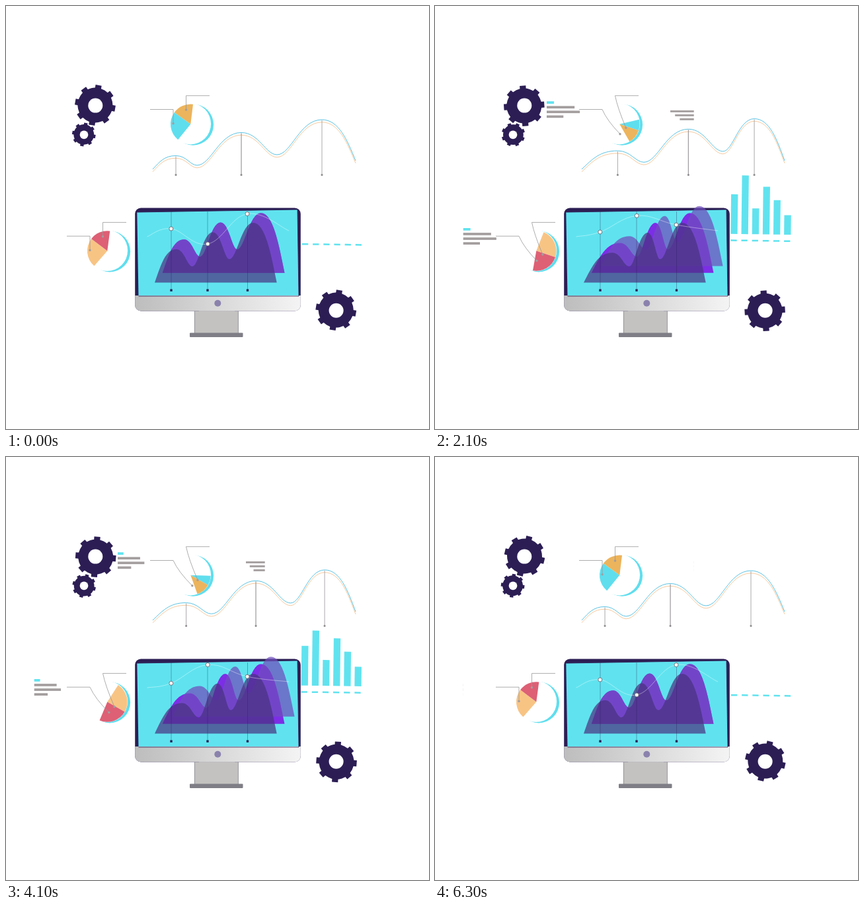
An HTML page with a canvas that plays this animation: 640 px wide and 640 px high, repeating every 6.4 s.

```html
<!DOCTYPE html>
<html>
<head>
<meta charset="utf-8">
<style>
html, body { margin: 0; width: 100%; height: 100%; overflow: hidden; background: #fff; }
canvas { display: block; width: 640px; height: 640px; }
</style>
</head>
<body>
<canvas id="stage"></canvas>
<script>
const LOOP = 6400;
const NAVY = '#2c1e54', CYAN = '#60e3ef', GRAY = '#a49e9f';
const canvas = document.getElementById('stage');
const dpr = window.devicePixelRatio || 1;
canvas.width = canvas.height = 640 * dpr;
const c = canvas.getContext('2d');

const mix = (a, b, k) => a + (b - a) * k;
const mixPoints = (from, to, k) => from.map((p, i) => [mix(p[0], to[i][0], k), mix(p[1], to[i][1], k)]);

// cubic-bezier(.6, 0, .4, 1)
function ease(x) {
  let lo = 0, hi = 1, s = .5;
  for (let i = 0; i < 24; i++) {
    s = (lo + hi) / 2;
    const r = 1 - s;
    if (1.8 * r * r * s + 1.2 * r * s * s + s * s * s < x) lo = s; else hi = s;
  }
  return s * s * (3 - 2 * s);
}

function yoyo(t, half) {
  const x = (t / half) % 2;
  return ease(x > 1 ? 2 - x : x);
}

function rect(x, y, w, h, fill) {
  c.fillStyle = fill;
  c.fillRect(x, y, w, h);
}

function disc(x, y, r, fill) {
  c.fillStyle = fill;
  c.beginPath();
  c.arc(x, y, r, 0, 7);
  c.fill();
}

function stroke(color, width) {
  c.strokeStyle = color;
  c.lineWidth = width;
  c.stroke();
}

function line(x1, y1, x2, y2, color, width) {
  c.beginPath();
  c.moveTo(x1, y1);
  c.lineTo(x2, y2);
  stroke(color, width);
}

// Path through alternating peaks (odd points, broad) and valleys (even points, narrow)
function humps(points) {
  const last = points.length - 1;
  const reach = i => i % 2 ? .5 : .32;
  c.beginPath();
  c.moveTo(...points[0]);
  for (let i = 1; i <= last; i++) {
    const [x0, y0] = points[i - 1], [x1, y1] = points[i];
    const dx = x1 - x0, dy = y1 - y0;
    const a = i === 1 ? [x0 + .3 * dx, y0 + .55 * dy] : [x0 + reach(i - 1) * dx, y0];
    const b = i === last ? [x1 - .25 * dx, y1 - .5 * dy] : [x1 - reach(i) * dx, y1];
    c.bezierCurveTo(...a, ...b, x1, y1);
  }
}

function gear(x, y, size, angle) {
  const tilt = (angle - 41) * Math.PI / 180;
  c.save();
  c.translate(x, y);
  c.scale(size, size);
  c.translate(.7 * Math.sin(tilt), -.7 * Math.cos(tilt));
  c.rotate(angle * Math.PI / 180);
  c.fillStyle = NAVY;
  c.beginPath();
  c.arc(0, 0, 26.5, 0, 7);
  c.fill();
  for (let i = 0; i < 8; i++) {
    c.fillRect(-4.6, -30.6, 9.2, 8);
    c.rotate(Math.PI / 4);
  }
  c.restore();
  disc(x, y, 11 * size, '#fff');
}

function textLines(x, y, q) {
  rect(x, y, 13 * q, 3.7, CYAN);
  [50, 59.5, 30].forEach((w, i) => rect(x, y + 7.1 * (i + 1), w * q, 3.7, GRAY));
}

function wedge(from, to, fill) {
  const rad = d => (d - 90) * Math.PI / 180;
  c.fillStyle = fill;
  c.beginPath();
  c.moveTo(279.3, 178.8);
  c.arc(279.3, 178.8, 30.3, rad(from), rad(to));
  c.fill();
}

function pointer(startX, cornerX, y, bend, dot) {
  c.beginPath();
  c.moveTo(startX, y);
  c.lineTo(cornerX, y);
  c.quadraticCurveTo(...bend, ...dot);
  stroke('#999', .8);
  disc(...dot, 1.7, GRAY);
}

function pie(dx, dy, p, lead, middle, tail, leadColor, tailColor) {
  c.save();
  c.translate(dx, dy);
  disc(283, 179.6, 31.1, '#5fdeee');
  disc(279, 178.3, 31.1, '#fff');
  const [a, b, d] = [lead, middle, tail].map(e => mix(e[0], e[1], p));
  wedge(d, b, tailColor);
  wedge(b, a, leadColor);
  pointer(308, 272.5, 135.7, [mix(272.5, 277, p), mix(146, 156, p)],
    [mix(272.5, 292.3, p), mix(157, 190, p)]);
  pointer(218, 253, 156.5, [mix(253, 262, p), mix(167, 175, p)],
    [mix(253, 285.6, p), mix(177.8, 197, p)]);
  c.restore();
}

function wave(q) {
  const points = mixPoints(
    [[222, 247], [257, 226.5], [289, 241], [356, 191.5], [410, 225], [478, 172], [529, 234]],
    [[222, 247], [280, 217.7], [321, 235.5], [388.5, 185.3], [440.5, 219], [484, 170.3], [529, 234]], q);
  humps(points.map(([x, y]) => [x, y + 3.8]));
  stroke('#f6c393', .9);
  humps(points);
  stroke('#5cc3e4', 1);
  [1, 3, 5].forEach(i => {
    const [x, y] = points[i];
    line(x, y + 1, x, 255.5, '#a2a0a2', i === 3 ? 1.3 : .9);
    disc(x, 255.5, 1.5, '#8d8a8d');
  });
}

function bars(p, q, reveal) {
  const drift = p * (1 - q);
  c.save();
  c.transform(1, .014, 0, 1, 448 - 5 * drift, 360.2 - 1.2 * drift - 6.5 * q);
  [60, 89, 39, 72, 52, 29.5].forEach((h, i) => {
    rect(i * 16.15, -1.3, 9.3, 2.5, CYAN);
    const shown = Math.min(h, reveal);
    if (shown > 1) {
      c.save();
      c.transform(1, 0, -.012, 1, i * 16.15, -9.8);
      rect(0, -shown, 10.3, shown, CYAN);
      c.restore();
    }
  });
  c.restore();
}

function monitor() {
  rect(285.3, 460, 66, 36, '#c3c2c0');
  c.strokeStyle = '#77757c';
  c.lineWidth = .7;
  c.strokeRect(285.3, 460, 66, 36);
  c.fillStyle = '#7f7e86';
  c.beginPath();
  c.roundRect(278, 494.5, 80.5, 6.5, 1);
  c.fill();

  c.beginPath();
  c.roundRect(195.2, 305.4, 250.6, 156, 9);
  c.fillStyle = NAVY;
  c.fill();
  c.save();
  c.clip();
  c.fillStyle = CYAN;
  c.beginPath();
  [[198.3, 312], [441, 308], [443, 439], [200.5, 439]].forEach(p => c.lineTo(...p));
  c.fill();
  const shade = c.createLinearGradient(195, 0, 446, 0);
  shade.addColorStop(0, '#bdbdbd');
  shade.addColorStop(1, '#f4f4f4');
  rect(195, 438, 251, 24, shade);
  c.restore();
  stroke(NAVY, .8);
  line(292, 461.7, 346, 461.7, '#c9c8c8', .8);
  disc(320.3, 449.8, 5, '#8b82ad');
}

function mountains(p, q) {
  const points = mixPoints(
    [[225, 418.6], [257.7, 368], [282, 394], [313, 342.3], [338, 383], [374, 328], [409.7, 418.6]],
    [[225, 418.6], [270.5, 374.3], [296, 394], [323.5, 343], [341, 383], [374, 328], [409.7, 418.6]], q);
  const layer = (dx, dy, fill) => {
    humps(points.map(([x, y]) => [x + dx, y + dy]));
    c.closePath();
    c.fillStyle = fill;
    c.fill();
  };
  layer(11.8, -14.8, '#7c2ee6');
  layer(11.8 + 17 * p, -14.8 - 12.5 * p, 'rgba(112,78,189,.72)');
  layer(0, 0, 'rgba(72,50,128,.7)');
}

function tracker(p) {
  const points = [[213.5, 349], [249.8, mix(337, 343, p)], [305.2, mix(360, 308.5, p)],
    [365, mix(314.5, 334.5, p)], [428, 340]];
  const at = i => points[Math.max(0, Math.min(4, i))];
  [250, 305, 365.5].forEach(x => {
    line(x, 311, x, 430, 'rgba(44,30,84,.45)', .8);
    rect(x - 1.7, 428.4, 3.4, 3.4, NAVY);
  });
  c.beginPath();
  c.moveTo(...points[0]);
  for (let i = 0; i < 4; i++) {
    const [a, b, d, e] = [at(i - 1), at(i), at(i + 1), at(i + 2)];
    c.bezierCurveTo(b[0] + (d[0] - a[0]) / 5, b[1] + (d[1] - a[1]) / 5,
      d[0] - (e[0] - b[0]) / 5, d[1] - (e[1] - b[1]) / 5, ...d);
  }
  stroke('rgba(255,255,255,.45)', .9);
  points.slice(1, 4).forEach(([x, y]) => {
    disc(x, y, 3, '#fff');
    stroke('#6b6670', .9);
  });
}

function draw(t) {
  const p = yoyo(t + 20, LOOP / 2);
  const q = yoyo(t + 20, LOOP / 4);
  const turn = .2208 * t;
  c.setTransform(dpr, 0, 0, dpr, 0, 0);
  rect(0, 0, 640, 640, '#fff');

  gear(135.3, 150.6, 1, 10 - turn);
  gear(118, 194.8, .58, 10 + turn);
  gear(499.6, 460.7, 1, 10 - turn);

  pie(0, 0, p, [7, 180], [-54, 142], [-141, 122], '#ecb45c', '#5fdeee');
  pie(-126, 191.7, p, [7.5, 228], [-53, 142], [-139, 55], '#dd6075', '#f8c484');

  textLines(169, 144.2, q);
  textLines(42.7, 336, q);
  [42.3, 33.8, 25.3].forEach((w, i) => rect(391.7 - w * q, 157.9 + 6 * i, w * q, 2.9, GRAY));

  wave(q);
  bars(p, q, 105 * yoyo(t + 170, LOOP / 2) - 4);
  monitor();
  mountains(p, q);
  tracker(p);
}

const start = performance.now();
function tick() {
  draw((performance.now() - start) % LOOP);
  requestAnimationFrame(tick);
}
tick();
</script>
</body>
</html>
```
